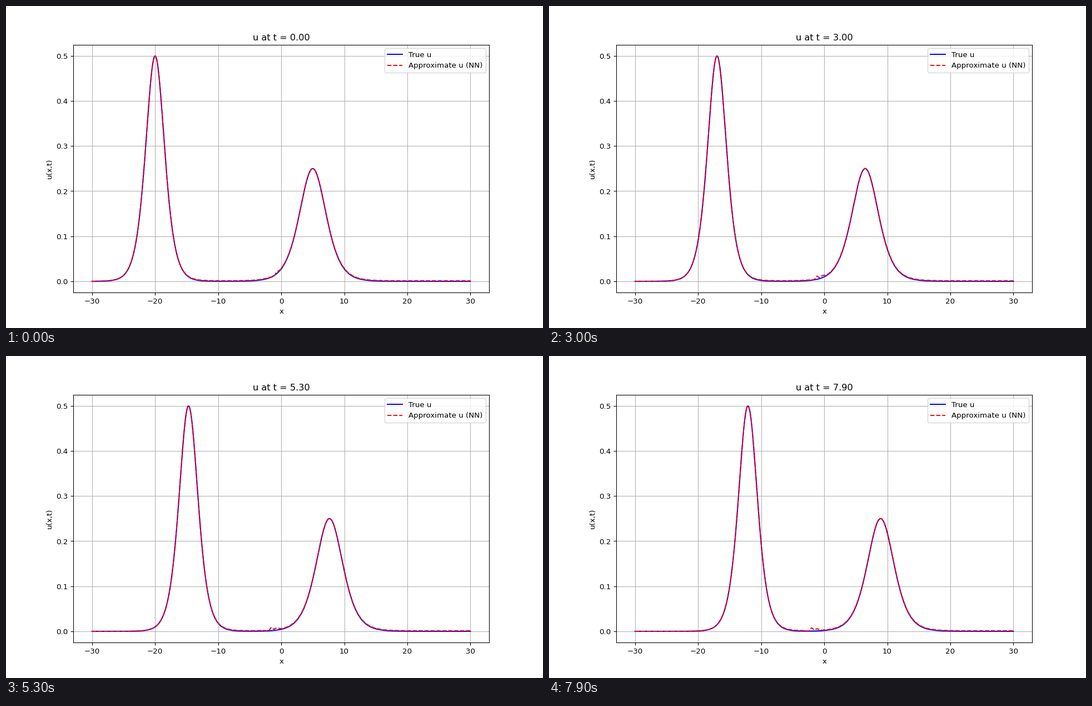
A matplotlib script for the animation above (8000 ms loop, 966 px wide and 580 px high).

```python
import numpy as np
import matplotlib.pyplot as plt
from matplotlib.animation import FuncAnimation

DPI = 96.6
# the small margin guards the pixel size against rounding down
SIZE = [(n + 1e-6) / DPI for n in (966, 580)]
FRAMES, STEP = 80, 0.1
x = np.linspace(-30, 30, 1000)


def soliton(c, x0, t):
    return c / 2 / np.cosh(np.sqrt(c) / 2 * (x - c * t - x0)) ** 2


def true_u(t):
    return soliton(1, -20, t) + soliton(0.5, 5, t)


def bump(center, width):
    return np.exp(-((x - center) / width) ** 2)


def nn_error(t):
    """Small offset behind the tall wave plus a ripple drifting left."""
    tall, low = t - 20, 0.5 * t + 5
    offset = 0.0007 * (1 + np.tanh(x - tall - 4)) - 0.0002
    offset -= 0.0008 * bump(low, 3)
    crest, fade = -0.65 - 0.17 * t, np.exp(-t)
    ripple = (0.0058 - 0.003 * fade) * bump(crest, 0.25)
    ripple += 0.0035 * (1 - fade) * bump(crest + 0.85, 0.45)
    ripple -= (0.003 * fade + 0.0002 * t) * bump(crest - 0.65, 0.3)
    return offset + ripple


fig, ax = plt.subplots(figsize=SIZE, dpi=DPI)
true_line, = ax.plot(x, true_u(0), "b-", label="True u")
nn_line, = ax.plot(x, true_u(0), "r--", label="Approximate u (NN)")
ax.set(xlim=(-33, 33), ylim=(-0.025, 0.525), xlabel="x", ylabel="u(x,t)")
ax.legend(loc="upper right")
ax.grid(True)
title = ax.set_title("")


def update(i):
    t = i * STEP
    u = true_u(t)
    true_line.set_ydata(u)
    nn_line.set_ydata(u + nn_error(t))
    title.set_text(f"u at t = {t:.2f}")
    return true_line, nn_line, title


anim = FuncAnimation(fig, update, frames=FRAMES, interval=100,
                     repeat=True, repeat_delay=0, blit=False)
plt.show()
```
